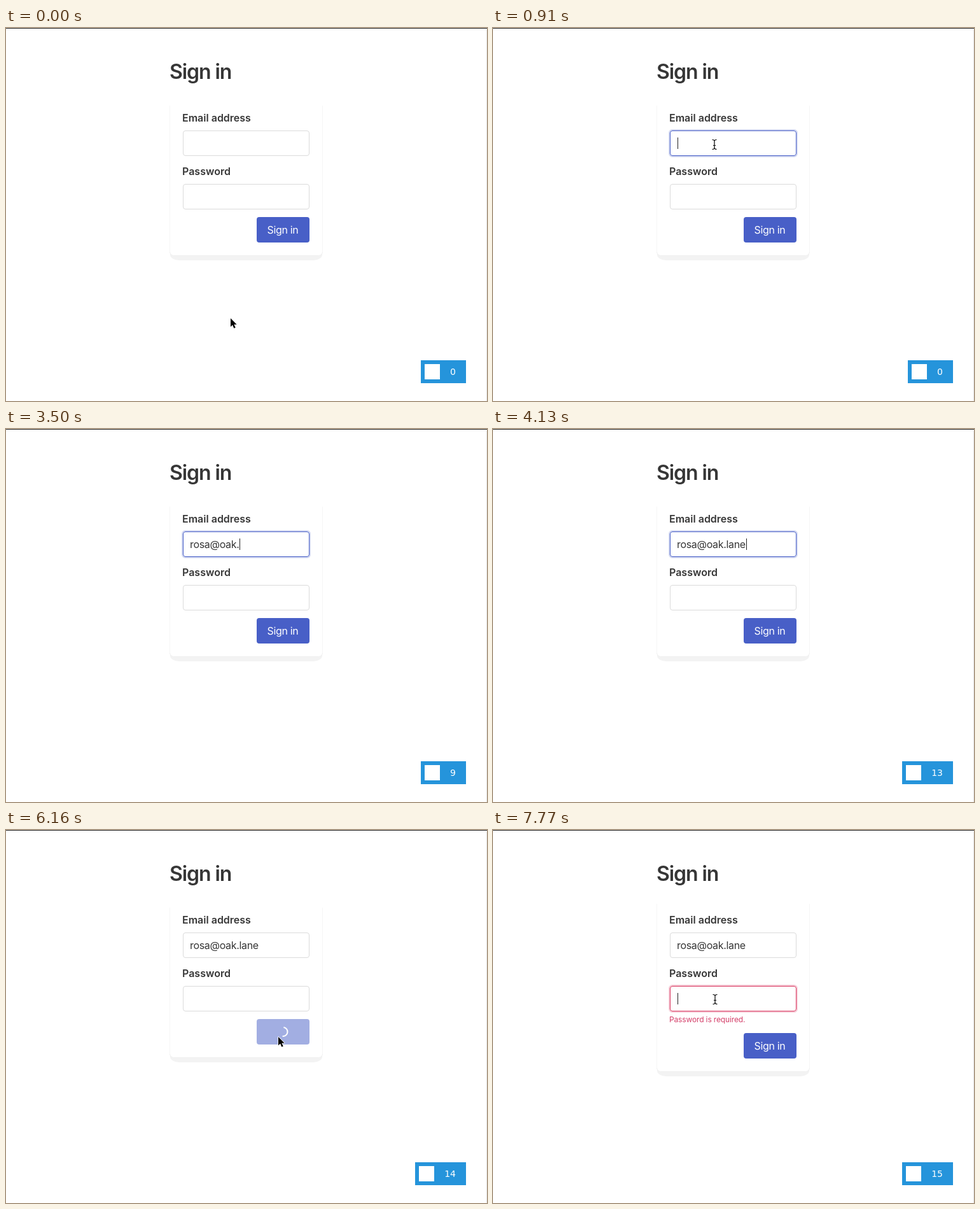
An HTML page that plays this animation: 756 by 586 pixels, repeating every 8 s.

```html
<!DOCTYPE html>
<html lang="en">
<head>
<meta charset="utf-8">
<title>Sign in</title>
<style>
  html, body { margin: 0; width: 100%; height: 100%; overflow: hidden; background: #fff; }
  svg { display: block; }
  text { font: 400 16px Inter, "Open Sans", sans-serif; letter-spacing: -.02em; fill: #363636; }
  .title { font-size: 32px; font-weight: 600; letter-spacing: -.034em; }
  .label { font-weight: 600; letter-spacing: 0; }
  .help { font-size: 12px; letter-spacing: -.012em; fill: #d4406a; }
  .count { font: 14px "DejaVu Sans", sans-serif; letter-spacing: 0; fill: #fff; text-anchor: end; }
  .button text { fill: #fff; text-anchor: middle; }
  .field rect { fill: #fff; stroke: #dbdbdb; }
  .field .ring { fill: none; stroke-width: 2; stroke-opacity: .25; visibility: hidden; }
  .hover .box { stroke: #b5b5b5; }
  .focus .box, .focus .ring { stroke: #485fc7; }
  .error .box, .error .ring { stroke: #d9365f; }
  .focus .ring { visibility: visible; }
  .halo { paint-order: stroke; stroke: #fff; stroke-width: 1.6; stroke-linejoin: round; }
</style>
</head>
<body>
<svg width="756" height="586" viewBox="0 0 756 586">
  <rect width="756" height="586" fill="#fff"/>
  <rect x="755" width="1" height="586" fill="#e4e4e4"/>
  <rect width="756" height="1" fill="#2a2a2a"/>
  <text class="title" x="257" y="79.5">Sign in</text>

  <g id="cardEnd">
    <rect x="258" y="330" width="239" height="35" rx="14" ry="9" fill="#f3f3f3"/>
    <rect x="257.5" y="300.5" width="240" height="57" rx="6" fill="#fff" stroke="#f0f0f0"/>
  </g>
  <rect x="257" y="116" width="241" height="236" fill="#fff"/>
  <path id="sides" fill="none" stroke="#f5f5f5"/>

  <text class="label" x="277" y="147">Email address</text>
  <text class="label" x="277" y="231">Password</text>
  <g id="email" class="field">
    <rect class="ring" x="277" y="160" width="201" height="42" rx="5"/>
    <rect class="box" x="278.5" y="161.5" width="198" height="39" rx="3.5"/>
    <text id="typed" x="289" y="187"></text>
  </g>
  <g id="password" class="field">
    <rect class="ring" x="277" y="244" width="201" height="42" rx="5"/>
    <rect class="box" x="278.5" y="245.5" width="198" height="39" rx="3.5"/>
  </g>
  <rect id="caret" width="1" height="18" fill="#222"/>
  <text id="help" class="help" x="277" y="302">Password is required.</text>

  <g id="button" class="button">
    <rect id="face" x="394" y="297" width="83" height="40" rx="4"/>
    <text id="caption" x="435" y="323">Sign in</text>
    <path id="spinner" d="M-4.95 -4.95A7 7 0 0 0 4.95 4.95" fill="none" stroke="#fff" stroke-width="2"/>
  </g>

  <rect id="badge" y="522" height="36" fill="#2594db"/>
  <rect id="mark" y="528" width="24" height="24" fill="#fff"/>
  <text id="count" class="count" x="707" y="545"></text>

  <g id="cursor">
    <path id="arrow" class="halo" d="M0 0V13.4L3 10.6L5.3 15.8L7.7 14.8L5.4 9.7H9.6Z"/>
    <g id="beam" fill="none">
      <path d="M-3.5 -7.5Q0 -7.5 0 -5Q0 -7.5 3.5 -7.5M0 -5V5M-3.5 7.5Q0 7.5 0 5Q0 7.5 3.5 7.5M-2 1.5H2" stroke="#fff" stroke-width="2.6"/>
      <path d="M-3.5 -7.5Q0 -7.5 0 -5Q0 -7.5 3.5 -7.5M0 -5V5M-3.5 7.5Q0 7.5 0 5Q0 7.5 3.5 7.5M-2 1.5H2" stroke="#000" stroke-width="1.2"/>
    </g>
    <g id="hand" stroke="#000" stroke-linejoin="round">
      <path fill="#fff" d="M-1.6 1.2C-1.6 -.6 1 -.6 1.2 1.2L1.8 6C2 4.6 4.4 4.6 4.4 6.4C5 5.4 6.8 5.6 6.9 7.2C7.6 6.4 9 6.8 9 8.4V11C9 13.5 7.6 14.5 7.6 17H-.6C-.8 15 -3 13 -5.4 9.8C-6.4 8.2 -4.6 7 -3.2 8.2L-1 10.2Z"/>
      <path d="M1.8 11.5V14.5M4 11.5V14.5M6.2 11.5V14.5" stroke-width=".8"/>
    </g>
  </g>
</svg>
<script>
const LOOP = 8000, STEP = 70;
const ADDRESS = "rosa@oak.lane";
const KEYS = [1820, 2030, 2170, 2450, 2870, 2940, 3150, 3220, 3500, 3710, 3780, 3920, 4060];
const FOCUS = 910, SUBMIT = 5810, REPLY = 6300, REFOCUS = 7700;
const CARET_ON = [[910, 1470], [1820, 4550], [5040, 5600], [7700, 8000]];
// time, x, y of the pointer's hot spot
const PATH = [
  [0, 353, 456], [700, 348, 183], [4690, 348, 183], [5320, 428, 327],
  [5390, 428, 327], [5460, 428, 325], [REPLY, 428, 325], [6650, 422, 381],
  [6930, 422, 381], [7350, 348, 264], [7420, 348, 264], [7560, 349, 266]
];

const $ = id => document.getElementById(id);
const show = (id, on) => $(id).setAttribute("visibility", on ? "visible" : "hidden");
const set = (id, attrs) => {
  for (const name in attrs) $(id).setAttribute(name, attrs[name]);
};
const ease = u => u * u * (3 - 2 * u);

function pointer(t) {
  const i = PATH.findIndex(key => key[0] > t);
  if (i < 0) return PATH[PATH.length - 1].slice(1);
  const [t0, x0, y0] = PATH[i - 1], [t1, x1, y1] = PATH[i];
  const u = ease((t - t0) / (t1 - t0));
  return [x0 + (x1 - x0) * u, y0 + (y1 - y0) * u];
}

function render(t) {
  const typed = KEYS.filter(k => k <= t).length;
  const loading = t >= SUBMIT && t < REPLY;
  const failed = t >= REPLY;
  const drop = failed ? 22 : 0;
  const inEmail = t >= FOCUS && t < SUBMIT;
  const inPassword = t >= REFOCUS;
  const visible = t < KEYS[0] || t >= 4760;

  const [x, y] = pointer(t);
  const over = (left, top) => visible && x >= left && x < 477 && y >= top && y < top + 40;
  const onEmail = over(278, 161), onPassword = over(278, 245);
  const onButton = over(394, 297 + drop) && !loading;

  $("typed").textContent = ADDRESS.slice(0, typed);
  set("email", { class: "field" + (inEmail ? " focus" : onEmail ? " hover" : "") });
  set("password", {
    class: "field" + (inPassword ? " focus" : onPassword ? " hover" : "") + (failed ? " error" : "")
  });

  show("caret", CARET_ON.some(([from, to]) => t >= from && t < to));
  set("caret", inPassword
    ? { x: 290, y: 256 }
    : { x: Math.round(290 + (typed ? $("typed").getComputedTextLength() : 0)), y: 172 });

  show("help", failed);
  set("cardEnd", { transform: `translate(0 ${drop})` });
  set("sides", { d: `M257.5 ${failed ? 116 : 122}V${352 + drop}M497.5 ${failed ? 116 : 122}V${352 + drop}` });

  set("button", { transform: `translate(0 ${drop})`, opacity: loading ? .5 : 1 });
  set("face", { fill: onButton ? "#3e56c4" : "#485fc7" });
  show("caption", !loading);
  show("spinner", loading);
  set("spinner", { transform: `translate(435.5 317) rotate(${(t - SUBMIT) * .72 - 20})` });

  const count = typed + (t >= SUBMIT) + failed;
  const left = count > 9 ? 643 : 652;
  $("count").textContent = count;
  set("badge", { x: left, width: 723 - left });
  set("mark", { x: left + 6 });

  show("cursor", visible);
  set("cursor", { transform: `translate(${Math.round(x)} ${Math.round(y)})` });
  const shape = onButton ? "hand" : (onEmail || onPassword) && !loading ? "beam" : "arrow";
  for (const id of ["arrow", "beam", "hand"]) set(id, { display: id === shape ? "inline" : "none" });
}

const start = performance.now();
function frame() {
  const t = (performance.now() - start) % LOOP;
  render(Math.floor(t / STEP) * STEP);
  requestAnimationFrame(frame);
}
frame();
</script>
</body>
</html>
```
